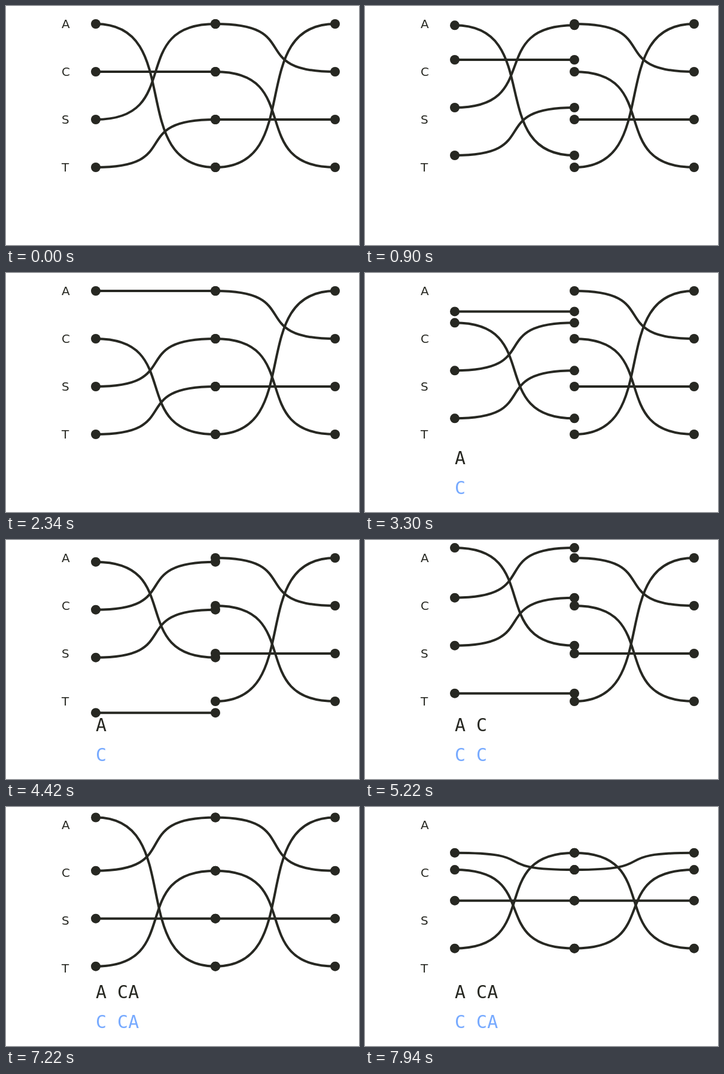
Write an HTML page that moves like this. It is 590 px wide and 400 px high and loops after 8 s.

```html
<!DOCTYPE html>
<html lang="en">
<head>
<meta charset="utf-8">
<title>Rotor cipher</title>
<style>
html, body { margin: 0; width: 100%; height: 100%; overflow: hidden; background: #fff; }
svg { display: block; }
text { font: 20px "DejaVu Sans", sans-serif; fill: #272822; }
.msg { font: 30px "DejaVu Sans Mono", monospace; }
path { fill: none; stroke-width: 4; stroke: currentColor; }
circle { fill: currentColor; }
</style>
</head>
<body>
<svg id="stage" width="590" height="400" viewBox="0 0 590 400"></svg>
<script>
const LOOP = 8000, START = 500, STEP = 80, TURN_STEPS = 24, CYCLE = 2240;
const INK = '#272822', BLUE = '#77aaff';
const LETTERS = 'ACST';
const PLAIN = 'A CA', CIPHER = 'C CA';
const SHOWN = [0, 1, 3, 4];      // characters visible after each key press
const KEYS = [0, 1, 0];          // contact pressed in each cycle
const ROTORS = [[3, 1, 0, 2], [1, 3, 2, 0]];
const stage = document.getElementById('stage');

const mod4 = n => (n % 4 + 4) % 4;

// Contacts slide up one row; the top one swings round to the bottom.
function contactY(i, p) {
  if (i) return 30 + 80 * (i - p);
  const q = 1 - p;
  return 30 * q ** 3 - 285 * p * q * q + 1185 * p * p * q + 270 * p ** 3;
}

function wire(x, y0, y1, color) {
  const end = x + 200;
  return `<g color="${color}"><path d="M${x} ${y0}C${x + 150} ${y0} ${x + 50} ${y1} ${end} ${y1}"/>` +
    `<circle cx="${x}" cy="${y0}" r="8"/><circle cx="${end}" cy="${y1}" r="8"/></g>`;
}

function render(t) {
  const ticks = t < START ? 0 : Math.floor((t - START) / STEP) + 1;
  const perCycle = CYCLE / STEP;
  const cycle = ticks ? Math.floor((ticks - 1) / perCycle) : 0;
  const n = ticks - cycle * perCycle;
  const lit = n > TURN_STEPS;
  const p = Math.min(n / TURN_STEPS, 1);
  const count = SHOWN[cycle + (lit ? 1 : 0)];

  let base = '', glow = '', signal = KEYS[cycle];
  ROTORS.forEach((map, r) => {
    const turned = r ? 0 : cycle;
    const shift = r && cycle < 3 ? 0 : p;
    let next = signal;
    map.forEach((to, from) => {
      const a = mod4(from - turned), b = mod4(to - turned);
      const on = lit && mod4(a - 1 + (r ? 1 : 0)) === signal;
      if (on) next = mod4(b - (r ? 0 : 1));
      const g = wire(150 + 200 * r, contactY(a, shift), contactY(b, shift), on ? BLUE : INK);
      if (on) glow += g; else base += g;
    });
    signal = next;
  });

  const labels = [...LETTERS].map((c, i) => `<text x="93" y="${37 + 80 * i}">${c}</text>`).join('');
  stage.innerHTML = labels + base + glow +
    `<text class="msg" x="150" y="320">${PLAIN.slice(0, count)}</text>` +
    `<text class="msg" x="150" y="370" style="fill:${BLUE}">${CIPHER.slice(0, count)}</text>`;
}

const begin = performance.now();
function frame() {
  render((performance.now() - begin) % LOOP);
  requestAnimationFrame(frame);
}
frame();
</script>
</body>
</html>
```
